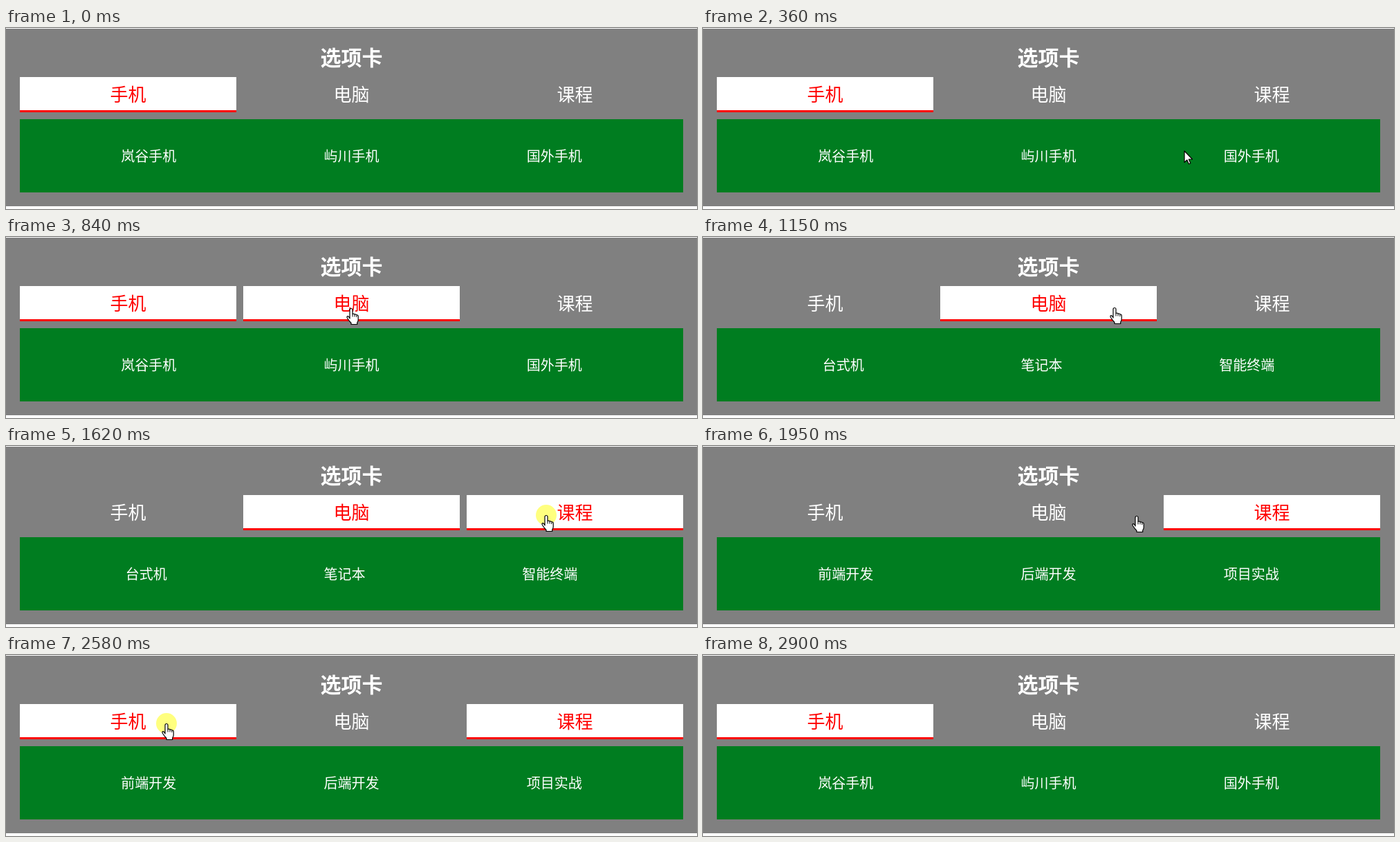
Animation of 999x262 px, one loop 3360 ms. Source, as an HTML page:

```html
<!DOCTYPE html>
<html lang="zh-CN">
<head>
<meta charset="utf-8">
<title>选项卡</title>
<style>
html, body { margin: 0; width: 100%; height: 100%; overflow: hidden; background: #fff; }
body { position: relative; font-family: "Noto Sans CJK SC", "Noto Sans CJK", sans-serif; color: #fff; }
.page { position: absolute; left: 0; top: 1px; width: 999px; height: 257px; background: #808080; }
h1 { position: absolute; top: 20px; width: 100%; margin: 0; font-size: 30px; line-height: 40px; text-align: center; }
.tabs { position: absolute; left: 20px; top: 70px; display: flex; gap: 10px; }
.tab { box-sizing: border-box; width: 313px; height: 51px; font-size: 26px; line-height: 48px; text-align: center; }
.tab.on { background: #fff; color: #f00; border-bottom: 3px solid #f00; }
.panel { position: absolute; box-sizing: border-box; left: 20px; top: 131px; width: 959px; height: 106px;
  padding: 0 39.5px; display: flex; justify-content: space-around; background: #007d20; font-size: 20px; line-height: 106px; }
svg { position: absolute; left: 0; top: 0; }
.outline { fill: #fff; stroke: #000; stroke-width: 1.2; stroke-linejoin: round; }
.crease { fill: none; stroke: #000; stroke-width: 1; }
</style>
</head>
<body>
<div class="page">
  <h1>选项卡</h1>
  <div class="tabs">
    <div class="tab">手机</div>
    <div class="tab">电脑</div>
    <div class="tab">课程</div>
  </div>
  <div class="panel"><span></span><span></span><span></span></div>
</div>
<svg width="999" height="262">
  <g id="pointer">
    <circle id="press" r="15" fill="#ff0" fill-opacity=".5"/>
    <g id="hand">
      <path class="outline" d="M-2 15V2.5a2 2 0 0 1 4 0V8.5q1.8-1.2 3 .6q2-.8 2.8.9q2.2-.5 2.4 1.8V17q0 2-1.5 4V23.5H0V21.5q-3-3-5.5-7q-1.2-2.2.3-2.9q1.4-.4 3.2 3z"/>
      <path class="crease" d="M2 8.5v4M5 9.5v3M7.8 10.5v2.5"/>
    </g>
    <path id="arrow" class="outline" d="M0 0V16.5L3.8 13L6.3 18.8L8.8 17.7L6.3 12H11.5Z"/>
  </g>
</svg>
<script>
const LOOP = 3360, ENTER = 140, LEAVE = 2900, STEP = 75;

const panels = [
  ['岚谷手机', '屿川手机', '国外手机'],
  ['台式机', '笔记本', '智能终端'],
  ['前端开发', '后端开发', '项目实战']
];

// Pointer strokes: eased from one resting point to the next, with an optional sag.
const strokes = [
  { start: ENTER, end: 770, from: [867, 243], to: [499, 103], power: 2.3, sag: 0 },
  { start: 1040, end: 1550, from: [499, 103], to: [781, 100], power: 2.6, sag: 0 },
  { start: 1855, end: 2365, from: [781, 100], to: [232, 99], power: 1.8, sag: 15 },
  { start: 2660, end: LEAVE, from: [232, 99], to: [285, 280], power: 1, sag: 0 }
];
const clicks = [
  { down: 860, up: 940, tab: 1 },
  { down: 1620, up: 1780, tab: 2 },
  { down: 2580, up: 2660, tab: 0 }
];
const hovers = [
  { start: 590, tab: 1 }, { start: 1240, tab: 2 }, { start: 2040, tab: 1 },
  { start: 2200, tab: 0 }, { start: 2740, tab: -1 }
];

const $ = id => document.getElementById(id);
const show = (el, on) => el.setAttribute('visibility', on ? 'visible' : 'hidden');
const latest = (list, key, t) => list.filter(item => item[key] <= t).pop();
const tabs = document.querySelectorAll('.tab');
const items = document.querySelectorAll('.panel span');
let current = -1;

// The pointer is redrawn only once per STEP.
function position(t) {
  const snapped = ENTER + Math.floor((t - ENTER) / STEP) * STEP;
  const { start, end, from, to, power, sag } = latest(strokes, 'start', snapped);
  const p = Math.min(1, (snapped - start) / (end - start));
  const eased = 1 - (1 - p) ** power;
  const [x, y] = from.map((v, i) => v + (to[i] - v) * eased);
  return [x, y + sag * Math.sin(Math.PI * p * p)];
}

function draw(t) {
  const active = latest(clicks, 'up', t)?.tab ?? 0;
  const hover = latest(hovers, 'start', t)?.tab ?? -1;
  tabs.forEach((tab, i) => tab.classList.toggle('on', i === active || i === hover));
  if (active !== current) {
    items.forEach((item, i) => { item.textContent = panels[active][i]; });
    current = active;
  }

  const inside = t >= ENTER && t < LEAVE;
  if (inside) {
    const [x, y] = position(t).map(Math.round);
    $('pointer').setAttribute('transform', `translate(${x} ${y})`);
  }
  show($('hand'), inside && hover >= 0);
  show($('arrow'), inside && hover < 0);
  show($('press'), clicks.some(({ down, up }) => t >= down && t < up));
}

const start = performance.now();
function tick() {
  draw((performance.now() - start) % LOOP);
  requestAnimationFrame(tick);
}
tick();
</script>
</body>
</html>
```
